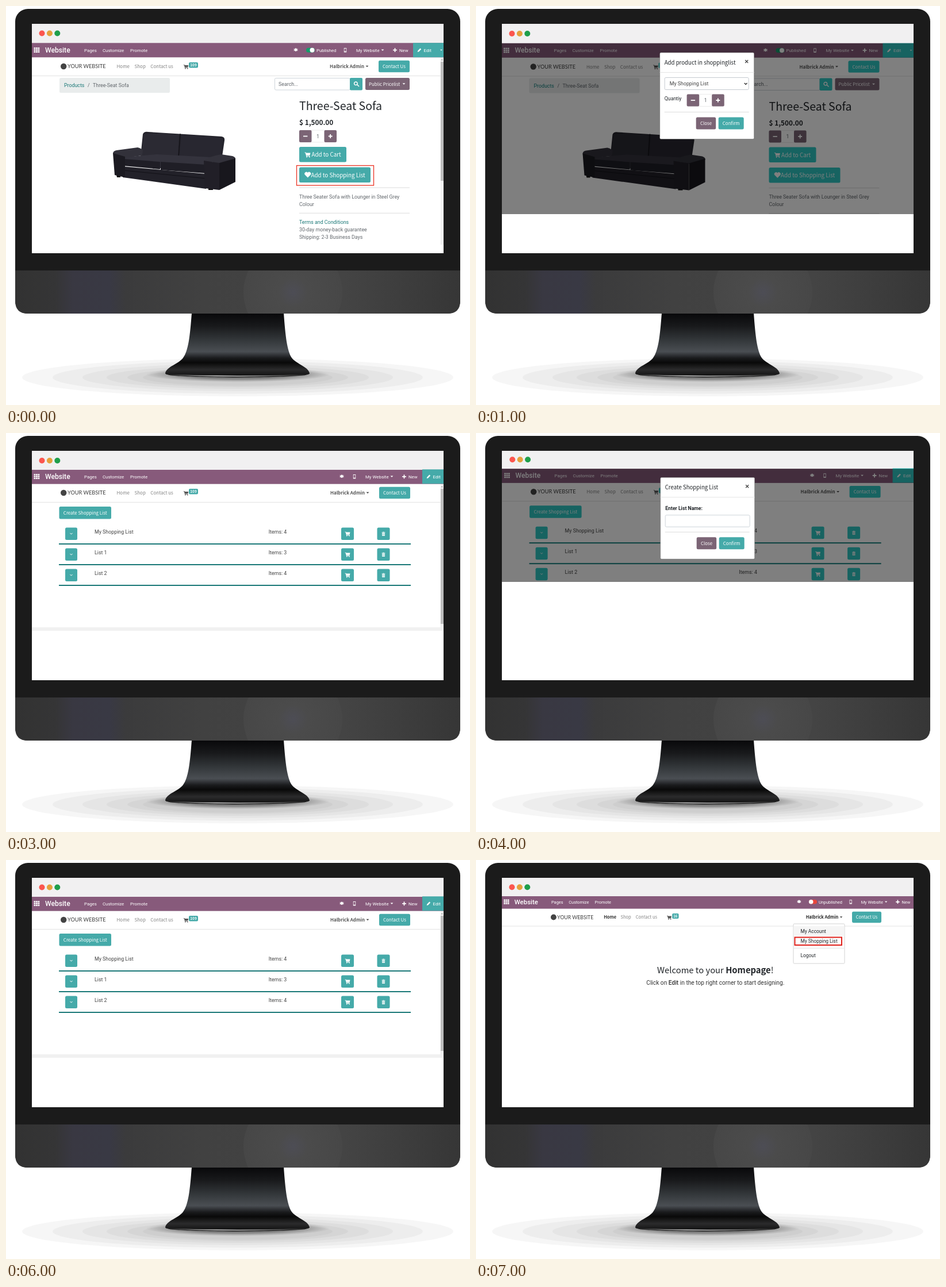
An HTML page that plays this animation: 807x694 px, repeating every 8 s.

```html
<!DOCTYPE html>
<html lang="en">
<head>
<meta charset="utf-8">
<title>Shopping list tour</title>
<style>
html, body { margin: 0; width: 100%; height: 100%; overflow: hidden; background: #fff; }
svg { display: block; width: 807px; height: 694px; --t: #45aaa9; --l: #1a7877; }
text { font-family: Roboto, sans-serif; white-space: pre; }
.c { font-family: 'Noto Sans CJK JP', 'Noto Sans CJK SC', 'Noto Sans CJK', 'Noto Sans', sans-serif; }
.lato { font-family: Lato, sans-serif; }
.arial { font-family: 'Liberation Sans', Arial, sans-serif; }
.m { font-weight: 500; }
.b { font-weight: 700; }
.mid { text-anchor: middle; }
.end { text-anchor: end; }
.dim { --t: #2ec8c4; --l: #14807e; }
.scene { visibility: hidden; animation: show 8s step-end infinite; animation-delay: calc(var(--i) * 1s - 8s); }
@keyframes show { 0% { visibility: visible; } 12.5%, 100% { visibility: hidden; } }
</style>
</head>
<body>
<svg viewBox="0 0 807 694">
  <defs>
    <linearGradient id="chin">
      <stop offset="0" stop-color="#323232"/><stop offset=".09" stop-color="#353536"/>
      <stop offset=".13" stop-color="#393842"/><stop offset=".21" stop-color="#393944"/>
      <stop offset=".25" stop-color="#3b3b3c"/><stop offset=".42" stop-color="#414141"/>
      <stop offset=".74" stop-color="#444"/><stop offset=".86" stop-color="#3e3e3e"/>
      <stop offset="1" stop-color="#363636"/>
    </linearGradient>
    <radialGradient id="glow">
      <stop offset="0" stop-color="#4d4d55"/><stop offset=".3" stop-color="#4b4b4b"/>
      <stop offset="1" stop-color="#474747"/>
    </radialGradient>
    <linearGradient id="neck" x2="0" y2="1">
      <stop offset="0" stop-color="#08080a"/><stop offset=".2" stop-color="#18191b"/>
      <stop offset=".42" stop-color="#33373a"/><stop offset=".6" stop-color="#4a4e53"/>
      <stop offset=".7" stop-color="#1a1b1d"/><stop offset=".77" stop-color="#090909"/>
      <stop offset=".88" stop-color="#2b2b2c"/><stop offset="1" stop-color="#0d0d0d"/>
    </linearGradient>
    <linearGradient id="rim">
      <stop offset="0" stop-color="#222"/><stop offset=".35" stop-color="#ddd"/>
      <stop offset=".65" stop-color="#aaa"/><stop offset="1" stop-color="#222"/>
    </linearGradient>
    <radialGradient id="shade">
      <stop offset=".55" stop-opacity=".4"/><stop offset="1" stop-opacity="0"/>
    </radialGradient>
    <clipPath id="screen"><path d="M45 31H761V430H45z"/></clipPath>
    <clipPath id="foot"><path d="M16 460H790V513Q790 535 768 535H38Q16 535 16 513z"/></clipPath>
  </defs>
  <g id="shadow"></g>
  <path fill="url(#neck)" d="M323 534H483C486 575 489 600 497 612 505 623 526 627 528 639 528 643 500 645 403 646 306 645 277 643 277 639 279 627 300 623 308 612 317 600 320 575 323 534z"/>
  <path fill="none" stroke="url(#rim)" stroke-width="1.3" d="M285 641.5Q403 646 520 641.5"/>
  <rect x="16" y="5" width="774" height="530" rx="22" fill="#1b1b1b"/>
  <g clip-path="url(#foot)">
    <path fill="url(#chin)" d="M16 460H790V535H16z"/>
    <circle cx="499" cy="498" r="86" fill="url(#glow)"/>
  </g>
  <path fill="#fff" d="M45 31H761V430H45z"/>
  <g id="scenes" clip-path="url(#screen)"></g>
</svg>
<script>
const TEAL = 'var(--t)', LINK = 'var(--l)', PLUM = '#7b6475', INK = '#212529', GREY = '#62676c', LINE = '#dcdcdc';

const rect = (x, y, w, h, fill, r = 0, stroke = 'none', sw = 1) =>
  `<rect x="${x}" y="${y}" width="${w}" height="${h}" rx="${r}" style="fill:${fill};stroke:${stroke};stroke-width:${sw}"/>`;
const text = (x, y, s, size, fill = INK, cls = '') =>
  `<text x="${x}" y="${y}" class="${cls}" style="font-size:${size}px;fill:${fill}">${s}</text>`;
const path = (d, fill, extra = '') => `<path d="${d}" style="fill:${fill}" ${extra}/>`;
const group = (tf, ...kids) => `<g transform="${tf}">${kids.join('')}</g>`;
const move = (x, y, ...kids) => group(`translate(${x} ${y})`, ...kids);
const rule = (x, y, w, color = LINE, h = 1) => rect(x, y, w, h, color);

const ICONS = {
  cart: 'M-5-4h2l.5 1H5L4 1.2H-1.6l.2.8H4v.9H-2.2L-3.8-3.1H-5zM-2.3 3.9a1 1 0 1 0 2 0a1 1 0 1 0-2 0zM2.3 3.9a1 1 0 1 0 2 0a1 1 0 1 0-2 0z',
  trash: 'M-3.2-3h2l.4-.9h1.6l.4.9h2v1h-6.4zM-2.6-1.5h5.2V4h-5.2zM-1.3-.6v3.6h.7v-3.6zM.6-.6v3.6h.7v-3.6z',
  heart: 'M0 5L-5 0A2.9 2.9 0 0 1 0-3.4A2.9 2.9 0 0 1 5 0z',
  caret: 'M-2.4-1.2h4.8L0 1.3z',
  pencil: 'M-3.3 3.3l.6-2.3L1.5-3.2l1.7 1.7L-1 2.7z',
  plus: 'M-3.4-.9h2.5v-2.5h1.8v2.5h2.5v1.8h-2.5v2.5h-1.8v-2.5h-2.5z',
  minus: 'M-3.7-.9h7.4v1.8h-7.4z',
  phone: 'M-2.2-3.8h4.4v7.6h-4.4zM-1.5-2.8v4.8h3v-4.8z',
  bug: 'M-1.6-1.8a1.6 1.6 0 0 1 3.2 0l1.7-.9v.8l-1.4 1h1.7v.8h-1.7l1.4 1.1v.8l-1.7-.9a1.7 2 0 0 1-3.2 0l-1.7.9v-.8l1.4-1.1h-1.7v-.8h1.7l-1.4-1v-.8z',
  up: 'M-2.6 1.3L0-1.3L2.6 1.3L2 1.8L0-.2L-2 1.8z',
  down: 'M-2.6-1.3L0 1.3L2.6-1.3L2-1.8L0 .2L-2-1.8z'
};
const icon = (name, x, y, fill = '#fff', k = 1) =>
  path(ICONS[name], fill, `fill-rule="evenodd" transform="translate(${x} ${y}) scale(${k})"`);
const button = (x, y, w, h, s, fill = TEAL, size = 7.9) =>
  rect(x, y, w, h, fill, 2.5) + text(x + w / 2, y + h / 2 + 3, s, size, '#fff', 'c mid');
const iconButton = (name, x, y, w = 22, k = .9) => rect(x, y, w, 21.5, TEAL, 2.5) + icon(name, x + w / 2, y + 10.8, '#fff', k);
const stepper = (x, y) => rect(x, y, 65, 21, '#fff', 2.5, '#ddd', .6) +
  rect(x, y, 21.5, 21, PLUM, 2) + rect(x + 43.5, y, 21.5, 21, PLUM, 2) +
  icon('minus', x + 10.7, y + 10.5) + icon('plus', x + 54.2, y + 10.5) +
  text(x + 32.5, y + 13.6, 1, 8.8, GREY, 'mid');

const chrome = (x, y) => rect(45, 31, 716, 34, '#f1f0f1') +
  ['#fb564f', '#e5a13c', '#1f9f4b'].map((c, i) => `<circle cx="${x + i * 13.4}" cy="${y}" r="5" fill="${c}"/>`).join('');

// Purple admin bar; off shifts the right hand items
function nav(x, top, h, cy, k, off, bugX, state) {
  const t = (px, s) => text(px, 3, s, 7.85, '#fff');
  let out = '';
  for (let i = 0; i < 9; i++) out += rect(48.5 + i % 3 * 3.5, -4.5 + (i / 3 | 0) * 3.2, 2.8, 2.4, '#fff');
  out += text(68, 4.2, 'Website', 12.1, '#fff', 'm') + t(136, 'Pages') + t(168, 'Customize') + t(216, 'Promote');
  out += icon('bug', bugX, 0);
  if (state) out += rect(bugX + 18, -4, 15, 8, state === 'Published' ? '#159c6c' : '#e8453c', 4) +
    `<circle cx="${bugX + (state === 'Published' ? 28.5 : 22)}" cy="0" r="4" fill="#fff"/>` + t(bugX + 36, state);
  const right = icon('phone', 590, 0) + t(609, 'My Website') + icon('caret', 655, 0) + icon('plus', 676.5, 0) + t(684, 'New') +
    rect(708, -12.5, 60, 25, TEAL) + icon('pencil', 719, 0) + t(726.5, 'Edit') + (off ? '' : icon('caret', 757, 0, '#fff', .8));
  return rect(45, top, 716, h, '#875a7b') +
    group(`translate(${45 + x} ${cy}) scale(${k}) translate(-45 0)`, out, move(off, 0, right));
}

function siteHead(left, right, cy, k, count, home) {
  const a = `<circle cx="5.2" cy="0" r="5.2" fill="#444"/>` + text(12, 3.2, 'YOUR WEBSITE', 9.2, '#3c3c3c', 'lato') +
    text(97.5, 3, 'Home', 8, home ? '#333' : '#858585', home ? 'c b' : 'c') +
    text(128.5, 3, 'Shop', 8, '#858585', 'c') + text(156.3, 3, 'Contact us', 8, '#858585', 'c') +
    icon('cart', 218, .5, '#555', .85) + rect(home ? 223.5 : 223, -7, home ? 12 : 16, 9.6, TEAL, 2) +
    text(home ? 229.5 : 231, .3, count, 6.4, '#fff', 'c b mid');
  const b = text(-85, 3, 'Halbrick Admin', 7.9, home ? '#222' : '#555', 'c b') +
    icon('caret', -20, 0, '#444') + button(0, -10.3, 54, 20.6, 'Contact Us');
  return group(`translate(${left} ${cy}) scale(${k})`, a) + group(`translate(${right} ${cy}) scale(${k})`, b);
}

const scrollY = (end, thumb) => rect(755.5, 90, 5.5, end - 90, '#f1f1f1') + rect(756, 97, 5, thumb - 97, '#bdbdbd') + icon('caret', 758.3, 93.5, '#888', -.7);

const sofa = (tf = '') => group(tf,
  path('M191 290h8v8h-6zM352 312h8v8h-8zM389 300h6v6h-6z', '#111'),
  path('M234 262L238 223Q240 218 247 219L375 227Q381 228 380 234L375 268z', '#25242c'),
  path('M240 223Q268 219 301 224L299 262H235z', '#2b2a33'),
  path('M305 224Q340 224 377 231L372 264H302z', '#282730'),
  path('M303 222L300 263', 'none', 'stroke="#111015" stroke-width="1.2"'),
  path('M205 263L262 258L375 264L348 274V290L205 276z', '#34333d'),
  path('M205 266L268 271V284L205 278zM269 271L348 276V291L269 285z', '#1f1e26'),
  path('M203 279L348 292V318L203 298z', '#222129'),
  path('M205 286L348 300', 'none', 'stroke="#121117"'),
  path('M186 257Q186 252 192 251L229 246Q236 248 238 251L237 260L207 264z', '#32313a'),
  path('M186 256L207 262V298L189 294z', '#1b1a21'),
  path('M344 269Q352 262 374 258L394 261Q400 263 399 267L371 274z', '#33323b'),
  path('M344 269L371 273V320L346 317z', '#211f27'),
  path('M371 273L399 265V306L371 320z', '#18171d'));

function product(x, y, marked) {
  const p = (py, s, c = GREY) => text(510, py, s, 8.83, c);
  return move(x, y,
    rule(45, 121, 716, '#e3e3e3'),
    rect(93, 125, 192, 26, '#e9ecec', 2.5), text(101, 141, 'Products', 8.83, LINK), text(142, 141, '/', 8.83, GREY),
    text(151, 141, 'Three-Seat Sofa', 8.83, GREY),
    rect(467.5, 125.5, 131, 20.5, '#fff', 2, '#ced4da'), text(474, 138.5, 'Search...', 8.83, GREY),
    rect(598, 125, 22, 21.5, TEAL, 2),
    '<path d="M611 137l3 3M611.2 134.7a2.8 2.8 0 1 1-5.6 0a2.8 2.8 0 1 1 5.6 0z" fill="none" stroke="#fff" stroke-width="1.5"/>',
    rect(625, 125, 77, 21, PLUM, 2.5), text(631, 138.5, 'Public Pricelist', 7.9, '#fff', 'c'), icon('caret', 692, 135.5),
    sofa(),
    text(510, 181, 'Three-Seat Sofa', 19.5, INK, 'c'), text(510, 207.4, '$ 1,500.00', 11.85, INK, 'c b'),
    stepper(510, 216),
    rect(510, 245, 82, 26.5, TEAL, 2.5), icon('cart', 524.5, 258.5), text(531.5, 262, 'Add to Cart', 9.8, '#fff', 'c'),
    rect(510, 280.5, 124, 26.5, TEAL, 2.5), icon('heart', 524.8, 293.5), text(530.5, 297.5, 'Add to Shopping List', 9.8, '#fff', 'c'),
    marked ? rect(505.5, 277.5, 134, 34.5, 'none', 0, '#ea3323', 1.3) : '',
    rule(510, 315.5, 192), p(334.5, 'Three Seater Sofa with Lounger in Steel Grey'), p(347.6, 'Colour'),
    rule(510, 359.8, 192), p(379, 'Terms and Conditions', LINK), p(392, '30-day money-back guarantee'), p(405, 'Shipping: 2-3 Business Days'));
}

const shopPage = (x, y, marked) => nav(x, 64.3 + y, 25, 76.7 + y, 1, 0, 504, 'Published') +
  siteHead(95 + x, 648 + x, 105 + y, 1, 109) + product(x, y, marked);

const listRow = (y, name, count, open) => iconButton(open ? 'up' : 'down', 103, y, 21) +
  text(154, y + 10, name, 8.83, '#444') + text(456.7, y + 10, 'Items: ' + count, 8.83, '#444') +
  iconButton('cart', 583, y) + iconButton('trash', 645.5, y) + rule(92, y + 27.5, 612, LINK, 2);

const listPage = (x, y, ...rows) => nav(x, 64 + y, 24.7, 75.8 + y, 1, 16, 584) +
  siteHead(95, 649 + x, 104 + y, 1, 109) +
  move(x, y, rule(45, 120, 716, '#e3e3e3'), button(92.5, 128, 90.5, 21.5, 'Create Shopping List'), ...rows);

const folded = () => [['My Shopping List', 4], ['List 1', 3], ['List 2', 4]].map(([s, n], i) => listRow(164.5 + i * 36, s, n)).join('');

const thumbs = [
  rect(110, 227, 36, 25, '#fff') + path('M112 231l21-3 12 4-20 4z', '#f2f2f2', 'stroke="#999" stroke-width=".5"') +
    path('M114 233v14M126 236v13M141 233v14M110 247h9M121 250h11M137 247h9', 'none', 'stroke="#222" stroke-width="1.4"'),
  rect(110, 265, 35.5, 35, '#fff', 2) + path('M117 268l18-1 4 3v26l-20 3-2-3z', '#1d1c1e') +
    path('M119 269l16-1v8q-8 5-16 2z', '#e08a2b') + path('M119 291l17-1v4l-17 2z', '#b5651e'),
  rect(110, 312, 35.5, 36, '#fff', 2) + path('M113 315l17-2 12 3v27l-13 4-16-4z', '#ddd') +
    path('M113 316l16 3v27l-16-4z', '#eee') + path('M113 325l16 3M113 334l16 3M129 319v27', 'none', 'stroke="#aaa"') +
    path('M114 343h3v3h-3zM128 345h3v3h-3zM139 342h3v3h-3z', '#333'),
  rect(110, 359, 36, 21, '#fff') + sofa('translate(79.5 325) scale(.165)')
];
const items = [
  ['[DESK0005] Customizable Desk (CONFIG) (Custom, White)', 3, 237.8],
  ['[FURN_9999] Office Design Software', 2, 274.7],
  ['[FURN_8855] Drawer', 100, 321.6],
  ['[FURN_8999] Three-Seat Sofa', 1, 370.4]
];
const table = () => rect(93, 194.5, 611, 209, '#eee') +
  [[122, 'Product'], [537.5, 'Quantity'], [604.5, 'Cart'], [653.3, 'Remove']].map(([x, s]) => text(x, 211.2, s, 8.7, INK, 'b')).join('') +
  rule(103, 221, 589, '#6fa3a3') +
  items.map(([s, n, y], i) => thumbs[i] + text(178, y, s, 8.83, LINK) + text(571.7, y, n, 8.83, '#333', 'end') +
    iconButton('cart', 599.5, y - 9.5) + iconButton('trash', 664, y - 9.5)).join('') +
  rule(103, 398, 589, '#4fa5a5');

function modal(x, y, h, title, body) {
  return move(x, y, rect(0, 0, 164, h, '#fff', 2, '#555', .5),
    text(8, 20.5, title, 9.65, INK, 'c'),
    path('M148.5 13l5 5M153.5 13l-5 5', 'none', 'stroke="#444" stroke-width="1.3"'), rule(0, 34, 164, '#e4e4e4'),
    body, rule(8, h - 47.5, 147), button(63, h - 38, 34.5, 21, 'Close', PLUM), button(102, h - 38, 44, 21, 'Confirm'));
}
const addForm = rect(8.5, 43.5, 146, 21, '#fff', 2, '#c5cad0') + text(17, 57.2, 'My Shopping List', 8.83, '#444') +
  path('M147 53l2.4 2.4L151.8 53', 'none', 'stroke="#222" stroke-width="1.3"') +
  text(8, 82.5, 'Quantiy', 8.83, INK) + stepper(47, 72.5);
const error = text(8.5, 112, 'This product already add in selected', 8.83, '#f21d12') + text(8.5, 125.2, 'shopping list.', 8.83, '#f21d12');
const nameForm = text(8.5, 57, 'Enter List Name:', 8.7, INK, 'b') + rect(8.5, 65.5, 147, 20.5, '#fff', 2, '#ced4da');

// Darkened page down to the given edge, white beneath
const dimmed = (page, top, end) => `<g class="dim">${page}</g>` + rect(45, top, 716, end - top, 'rgba(0,0,0,.5)') + rect(45, end, 716, 431 - end, '#fff');

const lists = () => listPage(0, 0, folded(), scrollY(338, 332), rect(45, 338, 716, 6, '#f1f1f1')) + chrome2;
const chrome2 = '';

const home = () => nav(0, 63, 21.7, 72.8, .945, 97, 592, 'Unpublished') + siteHead(130, 654, 99.5, .945, 16, true) +
  rule(45, 114.5, 716, '#e3e3e3') +
  rect(552, 111, 89, 69, '#fff', 1.5, '#d2d2d2') + rect(552.5, 115, 88, 17, '#f5f5f5') +
  text(564.5, 126.6, 'My Account', 8.4) + text(564.5, 143.6, 'My Shopping List', 8.4) + rule(552.5, 153, 88, '#e6e6e6') +
  text(564.5, 169, 'Logout', 8.4) + rect(554.5, 134.5, 81.5, 13.5, 'none', 0, '#e0211b', 2) +
  text(416.3, 197, 'Welcome to your <tspan class="b">Homepage</tspan>!', 14.8, INK, 'c mid') +
  text(416.3, 217, 'Click on <tspan class="m">Edit</tspan> in the top right corner to start designing.', 10.2, '#333', 'mid');

const scenes = [
  chrome(62.5, 47.5) + shopPage(0, 0, true) + scrollY(415, 304),
  chrome(62.5, 48) + dimmed(shopPage(-.5, .5), 64.8, 362) + modal(319.7, 81, 150.5, 'Add product in shoppinglist', addForm),
  chrome(62.5, 48) + listPage(0, 0, listRow(164.5, 'My Shopping List', 4, true), table(), rect(45, 403.5, 716, 6, '#f1f1f1'), scrollY(403.5, 264)) +
    rect(594.5, 262.5, 97.5, 28, 'none', 0, '#f5141a', 1.5) + path('M539 299.5L579 284.5L577.5 280.5L591 282.5L582.5 292L580.8 287.6z', '#f5141a') +
    text(339.5, 300, 'Add to cart and remove product', 13.24, '#f5141a', 'arial'),
  chrome(62.5, 48) + lists(),
  chrome(63.3, 46.3) + dimmed(listPage(.6, -1.8, folded()), 62.2, 259) + modal(320.7, 77.3, 142, 'Create Shopping List', nameForm),
  chrome(62.5, 46.3) + dimmed(shopPage(1, -2.6), 61.7, 412) + modal(321, 78, 185.5, 'Add product in shoppinglist', addForm + error),
  chrome(62.5, 47.5) + lists(),
  chrome(62.5, 47.3) + home()
];
document.getElementById('scenes').innerHTML = scenes.map((s, i) => `<g class="scene" style="--i:${i}">${s}</g>`).join('');

document.getElementById('shadow').innerHTML =
  [375, 322, 270, 228, 192, 165].map(r => `<ellipse cx="403" cy="646" rx="${r}" ry="${r * .088}" fill-opacity=".035"/>`).join('') +
  '<ellipse cx="403" cy="641" rx="160" ry="13" fill="url(#shade)"/>';
</script>
</body>
</html>
```
